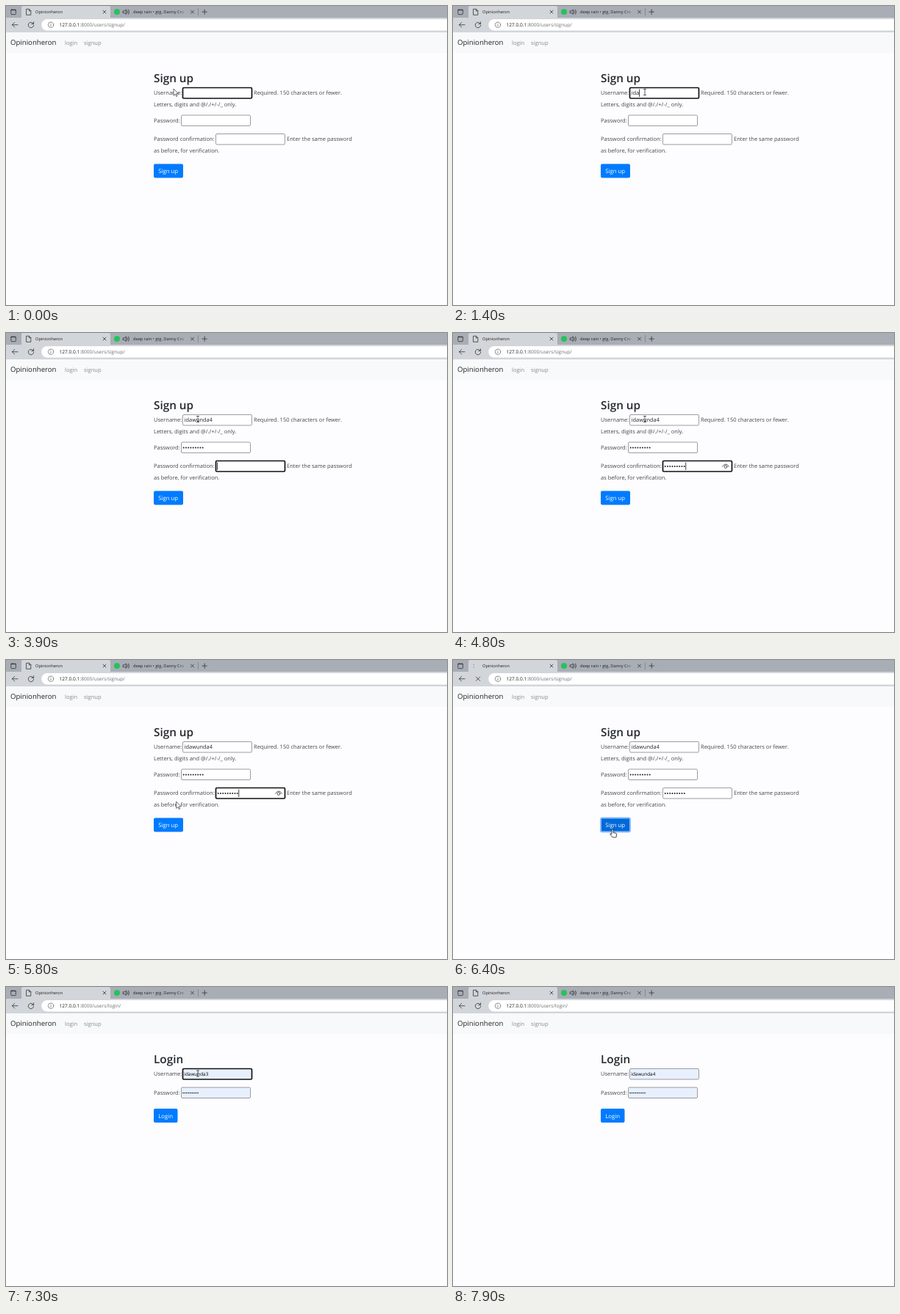
An HTML page for the animation above (8 s loop, 600x408 px).

```html
<!DOCTYPE html>
<html lang="en">
<head>
<meta charset="utf-8">
<title>Sign up</title>
<style>
  html, body { margin: 0; width: 100%; height: 100%; overflow: hidden; background: #fdfcfe; }
  svg { display: block; width: 100vw; height: 100vh; }
  text { font: 7.5px "Open Sans", "Noto Sans", sans-serif; fill: #43474b; text-rendering: geometricPrecision; white-space: pre; }
  .tab { font-size: 5.7px; fill: #222; }
  .url { font-size: 6.6px; fill: #6d6f73; }
  .brand { font-size: 9.6px; fill: #222; }
  .link { font-size: 7.6px; fill: #8a8b8c; }
  .title { font-size: 15.3px; font-weight: 600; fill: #24282c; }
  .value { font-size: 7.4px; fill: #222; }
  .filled { font-size: 6.4px; fill: #000; }
  .button { font-size: 7.8px; fill: #fff; }
  .line { fill: none; stroke: #333; stroke-width: .8; stroke-linecap: round; stroke-linejoin: round; }
</style>
</head>
<body>
<svg viewBox="0 0 600 408">
  <defs>
    <linearGradient id="fade" gradientUnits="userSpaceOnUse" x1="234" x2="247" y1="0" y2="0">
      <stop stop-color="#222"/><stop offset="1" stop-color="#222" stop-opacity="0"/>
    </linearGradient>
  </defs>
  <rect width="600" height="408" fill="#fdfcfe"/>

  <!-- tab strip -->
  <rect width="600" height="17" fill="#a9adb5"/>
  <path d="M21 17V2q0-2 2-2H140q2 0 2 2V17z" fill="#d2d5da"/>
  <rect x="6.8" y="5" width="6.6" height="6.6" rx="1" class="line"/>
  <path d="M6.8 5.6H13.4" class="line" stroke-width="1.8"/>
  <path d="M132 6l4 4m0-4l-4 4M251.500 6l4 4m0-4l-4 4M267 8h6.400M270.200 4.800v6.400" class="line"/>
  <path d="M261.500 3V13" stroke="#777b82" stroke-width=".7"/>
  <text class="tab" x="40" y="10.200">Opinionheron</text>
  <circle cx="151" cy="8" r="4" fill="#24c35c"/>
  <path d="M159.500 6.800h1.600l2.200-2v6.600l-2.200-2h-1.600zM165 6.400q1.200 1.700 0 3.400M166.600 5q2.200 3 0 6.200" class="line"/>
  <text class="tab" x="173" y="10.200" style="fill:url(#fade)">deep rain • gtg, Danny Cro</text>

  <!-- toolbar -->
  <rect y="16" width="600" height="20" fill="#d2d5da"/>
  <path d="M56 18H600V33.500H56a7.750 7.750 0 0 1 0-15.500z" fill="#fff"/>
  <path d="M16 25.700H8.400m3.300-3.300l-3.300 3.300 3.300 3.300" class="line"/>
  <g class="line" style="stroke:#777"><circle cx="61" cy="25.700" r="3.700"/><path d="M61 25.300v2.200M61 23.700v.1"/></g>

  <!-- site header -->
  <rect y="36" width="600" height="28" fill="#f8f9fa"/>
  <text class="brand" x="6" y="53.300">Opinionheron</text>
  <text class="link" x="80" y="52.600">login</text>
  <text class="link" x="106" y="52.600">signup</text>

  <g id="scene"></g>
</svg>
<script>
const LOOP = 8000, STEP = 100;
const scene = document.getElementById("scene");
const ruler = document.createElement("canvas").getContext("2d");

// [time, x, y]
const mouse = [[0, 228, 113], [100, 387, 149], [300, 261, 117.5], [5200, 261, 117.5], [6100, 217, 231],
  [7000, 217, 231], [7300, 261, 118], [7500, 261, 118], [7800, 587, 150], [8000, 587, 150]];

// [time, number of characters]
const nameKeys = [[0, 0], [1400, 3], [1500, 4], [1600, 5], [1700, 6], [1800, 7], [1900, 8], [2400, 9]];
const passKeys = [[0, 0], [2800, 1], [2900, 2], [3100, 3], [3200, 4], [3300, 5], [3400, 7], [3500, 8], [3700, 9]];

const latest = (keys, t) => keys.filter(k => k[0] <= t).pop()[1];

function mouseAt(t) {
  const i = mouse.findIndex(p => p[0] > t);
  const [t0, x0, y0] = mouse[i - 1], [t1, x1, y1] = mouse[i];
  const k = (t - t0) / (t1 - t0);
  return [x0 + (x1 - x0) * k, y0 + (y1 - y0) * k];
}

const text = (x, y, s, cls = "") => `<text x="${x}" y="${y}" class="${cls}">${s}</text>`;

const box = (x, y, focus, fill = "#fff") =>
  `<rect x="${x + .5}" y="${y + .5}" width="94" height="14.5" rx="1.5" fill="${fill}"
    stroke="${focus ? "#111" : "#85858a"}" stroke-width="${focus ? 1.7 : .8}"/>`;

const caret = (x, y) => `<path d="M${x} ${y + 2.500}v10.500" stroke="#111" stroke-width=".8"/>`;

const dots = (x, y, n, gap, size) => n
  ? `<path d="M${x} ${y}h${(n - 1) * gap + .01}" stroke="#222" stroke-width="${size}"
      stroke-linecap="round" stroke-dasharray="0 ${gap}"/>` : "";

const eye = (x, y) => `<g class="line"><path d="M${x - 4.5} ${y + .8}q4.500-7 9 0"/>
  <circle cx="${x}" cy="${y + 1}" r="1.900"/></g>`;

function nameField(t) {
  const typed = "idawunda4".slice(0, latest(nameKeys, t));
  const focus = t < 2600;
  const blinkOn = t >= 100 && t < 600 || t >= 1200;
  ruler.font = '7.4px "Open Sans", "Noto Sans", sans-serif';
  return box(240, 111, focus) + text(242.7, 121, typed, "value") +
    (focus && blinkOn ? caret(243 + ruler.measureText(typed).width, 111) : "");
}

function passField(x, y, n, focus) {
  return box(x, y, focus) + dots(x + 3.7, y + 8, n, 3.25, 2) +
    (focus ? caret(x + 2.5 + n * 3.25, y) + (n ? eye(x + 86, y + 7.5) : "") : "");
}

function button(y, width, label, hover, ring) {
  return `<rect x="201" y="${y}" width="${width}" height="19" rx="2" fill="${hover ? "#0069d9" : "#007bff"}"
    ${ring ? 'stroke="#85bdf8" stroke-width="2"' : ""}/>` + text(207.2, y + 12.5, label, "button");
}

function signup(t, hover) {
  const confirmed = Math.max(0, Math.min(9, (t - 3900) / STEP));
  return text(201, 104, "Sign up", "title") +
    text(201, 121, "Username:") + nameField(t) + text(337, 121, "Required. 150 characters or fewer.") +
    text(201, 137, "Letters, digits and @/./+/-/_ only.") +
    text(201, 158.7, "Password:") + passField(238, 148.5, latest(passKeys, t), t >= 2600 && t < 3900) +
    text(201, 184.4, "Password confirmation:") + passField(285, 174, confirmed, t >= 3900 && t < 6200) +
    text(382, 184.4, "Enter the same password") + text(201, 200.4, "as before, for verification.") +
    button(215.5, 40, "Sign up", hover, t >= 6200);
}

function login(t) {
  const focus = t < 7700;
  return text(201, 104, "Login", "title") +
    text(201, 121, "Username:") + box(240, 111, focus, "#e8f0fe") +
    text(242.3, 121, t < 7400 ? "idawunda3" : "idawunda4", "filled") +
    (focus && (t < 7100 || t >= 7400) ? caret(242.5, 111) : "") +
    text(201, 146.7, "Password:") + box(238, 136.5, false, "#e8f0fe") + dots(241, 144.5, 9, 2.5, 1.7) +
    button(166, 32.5, "Login");
}

function browserState(loading, page) {
  const favicon = loading
    ? '<path d="M28.200 6.300v.1M28.200 9.900v.1" class="line" stroke-width="1.700"/>'
    : '<path d="M28 4.200h3.600l2.200 2.200v5.800H28zM31.400 4.400v2.200h2.200" class="line"/>';
  const reload = loading
    ? '<path d="M31.300 23l5.400 5.400m0-5.400l-5.400 5.400" class="line"/>'
    : '<path d="M37.300 24.300a3.700 3.700 0 1 0 .4 1.900M37.600 21.700v2.700h-2.700" class="line"/>';
  return favicon + reload +
    text(72.5, 28.2, `<tspan fill="#222">127.0.0.1</tspan>:8000/users/${page}/`, "url");
}

const shapes = {
  arrow: '<path d="M0 0V9.300L2.200 7.300 3.700 10.500 5 9.900 3.600 6.800H6.600z" fill="#fff" stroke="#333" stroke-width=".7"/>',
  beam: '<path d="M-1.500-4h3M0-4V4M-1.500 4h3" class="line"/>',
  hand: '<path d="M-1 1a1 1 0 0 1 2 0V4.500l3.700.9q1.100.3 1 1.400L5 11H.2L-3.200 6.900q0-1.400 1.200-1L-1 6.700z" fill="#fff" stroke="#222" stroke-width=".8" stroke-linejoin="round"/>'
};

function render(t) {
  const [x, y] = mouseAt(t);
  const overField = x > 239 && x < 335 && y > 110 && y < 127;
  const shape = y >= 216 ? "hand" : overField ? "beam" : "arrow";
  const loggedPage = t >= 6600;
  scene.innerHTML = browserState(t >= 6300 && !loggedPage, loggedPage ? "login" : "signup") +
    (loggedPage ? login(t) : signup(t, shape === "hand")) +
    (t < 7900 ? `<g transform="translate(${x} ${y})">${shapes[shape]}</g>` : "");
}

let shown = -1;
function tick() {
  const t = Math.floor(performance.now() % LOOP / STEP) * STEP;
  if (t !== shown) render(shown = t);
  requestAnimationFrame(tick);
}
tick();
</script>
</body>
</html>
```
